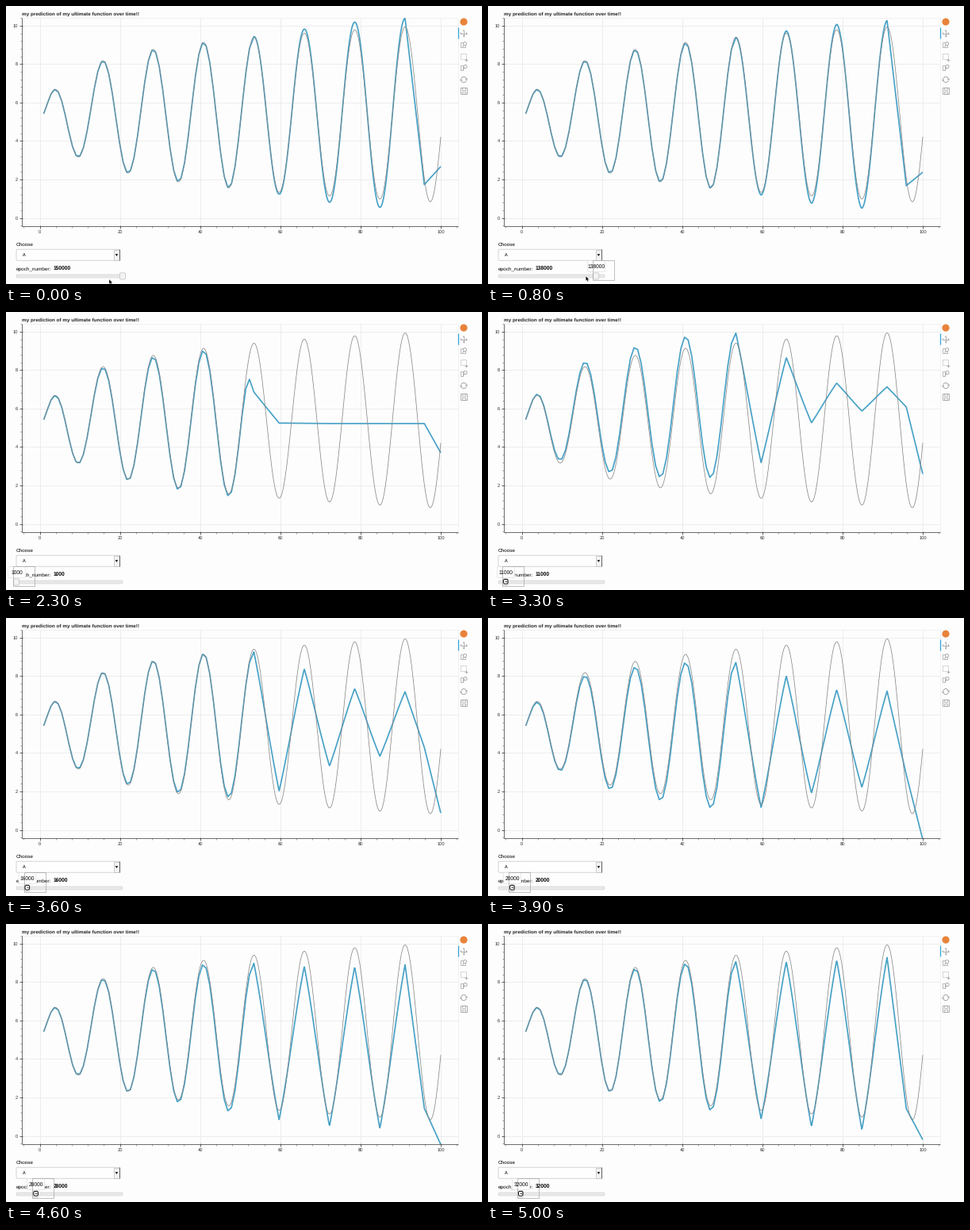
Recreate the animation shown at these times as a matplotlib script. Size 600 by 351 pixels, loop 5.1 s.

```python
import numpy as np
import matplotlib.pyplot as plt
from matplotlib.animation import FuncAnimation
from matplotlib.patches import Arc, Circle, FancyBboxPatch, Polygon, Rectangle

W, H, DPI = 600, 351, 72  # at 72 dpi one point equals one pixel
FRAMES, INTERVAL = 51, 100
LEFT, TOP, RIGHT, BOTTOM = 19.5, 15, 569.5, 277.5
BLUE, INK, AXIS, ICON = "#47a1c6", "#222222", "#4a4a4a", "#a0a0a0"

plt.rcParams.update({
    "font.family": "Liberation Sans",
    "text.hinting": "none",
    "path.simplify": False,
})

fig = plt.figure(figsize=(W / DPI, H / DPI), dpi=DPI, facecolor="#fdfdfd")
ax = fig.add_axes([0, 0, 1, 1])
ax.set_xlim(0, W)
ax.set_ylim(H, 0)
ax.axis("off")


def px(x):
    return 42.5 + 5.055 * np.asarray(x)


def py(y):
    return 267.5 - 24.27 * np.asarray(y)


def line(xs, ys, color=AXIS, lw=0.8, **kw):
    kw.setdefault("solid_capstyle", "butt")
    return ax.plot(xs, ys, color=color, lw=lw, **kw)[0]


def text(x, y, s, size=6.4, color="black", **kw):
    return ax.text(x, y, s, fontsize=size, color=color, va="baseline", **kw)


def box(x, y, w, h, face="none", edge="none", lw=0.7, r=0.0, z=2):
    if r:
        patch = FancyBboxPatch((x, y), w, h, fc=face, ec=edge, lw=lw, zorder=z,
                               boxstyle=f"round,pad=0,rounding_size={r}")
    else:
        patch = Rectangle((x, y), w, h, fc=face, ec=edge, lw=lw, zorder=z)
    return ax.add_patch(patch)


def shape(points, face=ICON):
    return ax.add_patch(Polygon(points, fc=face, ec="none", zorder=4))


# ---- the function and its learned approximation ----
MEAN = 5.42
GRID = np.linspace(1, 100, 991)
DENSE = np.arange(1, 53, 0.9)               # well learned, many short pieces
TURNS = np.pi * np.arange(17, 30, 2)        # later extremes, long pieces
LAST_BEND = 95.9
VERTICES = np.concatenate([DENSE, TURNS, [LAST_BEND, 100]])

# how the fit develops over thousands of epochs
EPOCHS = [1, 11, 20, 28, 32, 76, 150]
DRIFT = [-0.2, 1.1, -0.7, -0.8, -0.65, -0.5, 0]
GAIN = [0, 0.13, 0.55, 0.95, 1, 1.05, 1.1]
END = [3.7, 2.6, -0.5, -0.45, -0.2, 0.85, 2.67]


def swing(x):
    return np.log(x) * np.sin(x / 2)


def prediction(epoch):
    """Right at first, fading to the far gain and drift, drawn in pieces."""
    drift, gain, end = (np.interp(epoch, EPOCHS, v) for v in (DRIFT, GAIN, END))
    reach = min(66, 53 + 1.2 * (epoch - 1))
    power = np.interp(epoch, [20, 28], [1, 2.5])

    def wave(x):
        known = 1 / (1 + np.exp((x - reach) * 3 / (reach - 50)))
        shift = drift * np.minimum(1, (x / 70) ** power)
        return MEAN + shift + (gain + (1 - gain) * known) * swing(x)

    values = wave(VERTICES)
    values[-1] = end
    pieces = np.interp(GRID, VERTICES, values)
    bend = np.where((GRID > TURNS[0]) & (GRID < TURNS[-1]), epoch / 150, 0)
    return (1 - bend) * pieces + bend * wave(GRID)


# ---- plot frame ----
for v in range(0, 101, 20):
    x = px(v)
    line([x, x], [TOP, BOTTOM], "#e9e9e9", zorder=1)
    line([x, x], [BOTTOM - 1, BOTTOM + 3.5])
    text(x, 287.3, str(v), 5.7, "#333333", ha="center")
for v in range(0, 11, 2):
    y = py(v)
    line([LEFT, RIGHT], [y, y], "#e9e9e9", zorder=1)
    line([LEFT - 3, LEFT + 1], [y, y])
    text(15, y + 2, str(v), 5.7, "#333333", ha="right")
for v in range(-4, 105, 4):
    line([px(v)] * 2, [BOTTOM, BOTTOM + 2], lw=0.5)
for v in np.arange(-0.4, 10.41, 0.4):
    line([LEFT - 1.5, LEFT], [py(v)] * 2, lw=0.5)
line([LEFT, LEFT], [TOP, BOTTOM])
line([LEFT, RIGHT], [BOTTOM, BOTTOM])
line([LEFT, RIGHT, RIGHT], [TOP, TOP, BOTTOM], "#ececec", 0.7, zorder=1)
text(20, 11.6, "my prediction of my ultimate function over time!!",
     color=INK, weight="bold")

plot_area = Rectangle((LEFT, TOP), RIGHT - LEFT, BOTTOM - TOP,
                      transform=ax.transData)
curve = line(px(GRID), py(GRID), BLUE, 1.7, zorder=3, solid_joinstyle="round")
target = line(px(GRID), py(MEAN + swing(GRID)), "#868686", 0.75, zorder=4)
for art in (curve, target):
    art.set_clip_path(plot_area)


# ---- toolbar ----
def lens(x, y):
    ax.add_patch(Circle((x, y), 2.1, fc="#fdfdfd", ec=ICON, lw=0.8, zorder=3))
    line([x - 1.2, x - 3], [y + 1.7, y + 4], ICON, 0.9)


def toolbar(x=577):
    ax.add_patch(Circle((x, 20), 4.6, fc="#e8833a", ec="none"))
    line([570.3, 570.3], [27, 41], "#35a5d8", 1.3)
    line([x - 4, x + 4], [34.5, 34.5], ICON)
    line([x, x], [30.5, 38.5], ICON)
    for dx, dy in ((1, 0), (-1, 0), (0, 1), (0, -1)):
        tip = np.array([x + 4.6 * dx, 34.5 + 4.6 * dy])
        back, side = np.array([dx, dy]) * 1.7, np.array([dy, dx]) * 1.4
        shape([tip, tip - back + side, tip - back - side])
    box(x - 4, 45.5, 5.5, 6, edge=ICON)
    lens(x + 1.5, 47.5)
    box(x - 4, 60, 7, 7, edge=ICON).set_linestyle((0, (1.5, 1.2)))
    line([x + 1, x + 5], [67.5, 67.5], ICON)
    line([x + 3, x + 3], [65.5, 69.5], ICON)
    box(x - 4, 74.5, 3.2, 6, edge=ICON)
    lens(x + 2, 76.5)
    for start, s in ((20, 1), (200, -1)):
        ax.add_patch(Arc((x, 93), 7, 7, theta1=start, theta2=start + 140,
                         color=ICON, lw=0.9))
        shape(np.array([x, 93]) + s * np.array([(4.6, -1.8), (4.2, 1),
                                                (1.8, -0.4)]))
    box(x - 3.8, 103.2, 7.6, 7.6, edge=ICON, lw=0.8)
    box(x - 2, 103.2, 4, 2.6, edge=ICON)
    box(x - 2.4, 107.5, 4.8, 3.3, edge=ICON)


toolbar()

# ---- widgets ----
text(13, 303.3, "Choose")
box(13, 307.2, 130, 14, "#fefefe", "#c4c4c4", r=1.5)
box(136, 307.6, 6.6, 13.2, "#f4f4f4", "#b0b0b0", lw=0.6)
line([142.8, 142.8], [307.4, 321.2], "#555555", 0.9)
shape([(137.6, 313.2), (141.2, 313.2), (139.4, 315.8)], "black")
text(21, 316.3, "A", 5.6)
text(13, 333.3, "epoch_number:")
value_text = text(60, 333.3, "", 6.6, weight="bold")
box(13, 339, 134, 4, "#e9e9e9", "#cfcfcf", lw=0.6, r=1.6)

handle = box(0, 336.9, 7, 8.2, "#f3f3f3", "#c0c0c0", r=1.5, z=4)
tip_box = box(0, 321.5, 22, 14, "#fefefe", "#dcdcdc", lw=0.6, r=1.5, z=5)
focus = box(0, 320.5, 27, 25.5, edge="#9a9a9a", lw=0.6, z=6)
tip_text = text(0, 330.6, "", 6.6, ha="center", zorder=7)

ARROW = np.array([(0, 0), (0, 6), (1.4, 4.8), (2.4, 7), (3.4, 6.5),
                  (2.5, 4.4), (4.3, 4.4)])
arrow = ax.add_patch(Polygon(ARROW, fc="black", ec="white", lw=0.3, zorder=9))
hand = ax.add_patch(FancyBboxPatch((0, 337.4), 5.6, 5.8, fc="white", ec="black",
                                   lw=0.9, zorder=9,
                                   boxstyle="round,pad=0,rounding_size=2"))
knuckles = line([0, 0], [339.8, 339.8], "black", 0.7, zorder=10)

# ---- motion ----
DRAG_KEYS = [7, 13, 17, 29, 33, 39, 46, 50]
DRAG_EPOCHS = [150, 76, 1, 1, 11, 20, 28, 32]
GRABBED, RELEASED, RETURNED = 5, 14, 30


def update(i):
    epoch = int(round(np.interp(i, DRAG_KEYS, DRAG_EPOCHS)))
    label = str(epoch * 1000)
    hx = 13 + 134 * (epoch - 1) / 149

    curve.set_ydata(py(prediction(epoch)))
    value_text.set_text(label)
    handle.set_x(hx - 3.5)
    tip_box.set_x(hx - 10.5)
    focus.set_x(hx - 3.8)
    tip_text.set_x(hx + 0.6)
    tip_text.set_text(label)
    for art in (tip_box, focus, tip_text):
        art.set_visible(i >= GRABBED)

    mouse_keys = [0, GRABBED, 7, 13]
    arrow.set_xy(ARROW + [np.interp(i, mouse_keys, [130, 147, 147, 4.5]),
                          np.interp(i, mouse_keys, [345, 340, 342, 336])])
    arrow.set_visible(i < RELEASED)
    hand.set_x(hx - 2.5)
    knuckles.set_xdata([hx - 0.8, hx + 1.8])
    for art in (hand, knuckles):
        art.set_visible(i >= RETURNED)
    return []


anim = FuncAnimation(fig, update, frames=FRAMES, interval=INTERVAL,
                     init_func=lambda: update(0), repeat=True, repeat_delay=0)
plt.show()
```
